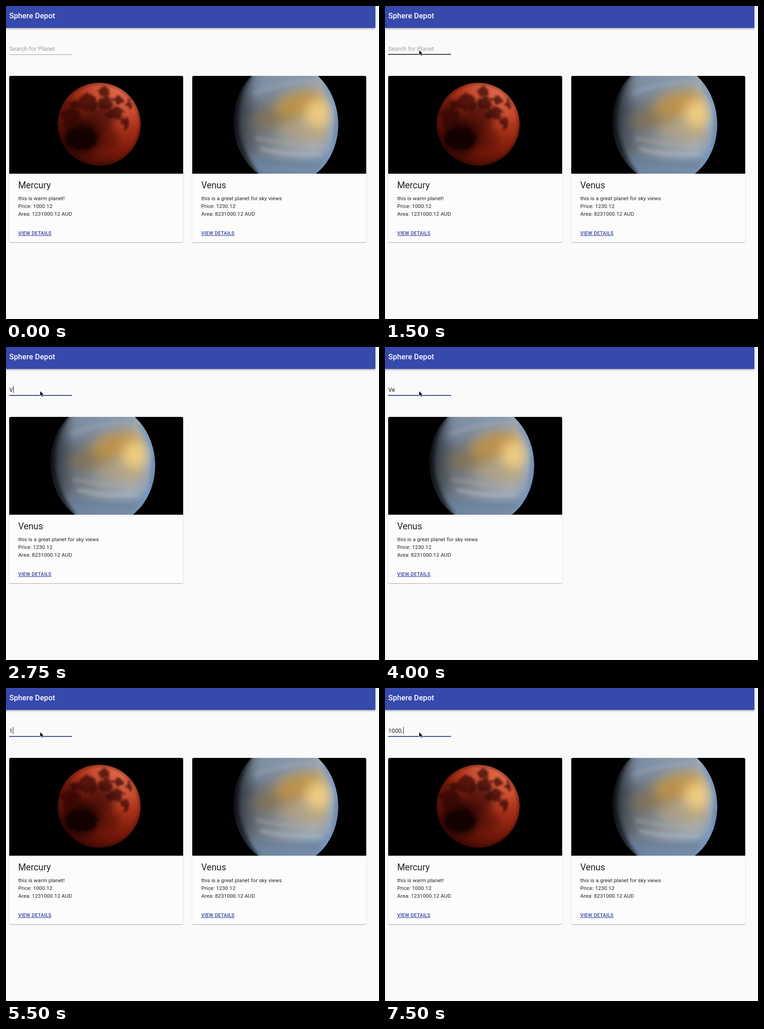
An HTML page that plays this animation: 817 by 685 pixels, repeating every 8 s.

```html
<!DOCTYPE html>
<html lang="en">
<head>
<meta charset="utf-8">
<title>Sphere Depot</title>
<style>
  html, body { margin: 0; width: 100%; height: 100%; overflow: hidden; background: #fafafa; }
  body { position: relative; font-family: Roboto, sans-serif; }
  .bar {
    position: absolute; left: -20px; top: -10px; width: 829px; height: 57.5px; background: #3649ac;
    box-shadow: 0 1.6px 3.3px -.8px rgba(0,0,0,.2), 0 3.3px 4.1px rgba(0,0,0,.14), 0 .8px 8.2px rgba(0,0,0,.12);
  }
  .card {
    position: absolute; left: 7px; top: 153px; width: 381px; height: 364px;
    border-radius: 3.3px; background: #fcfcfc;
    box-shadow: 0 .8px 2.5px rgba(0,0,0,.2), 0 .8px .8px rgba(0,0,0,.14), 0 1.6px .8px -.8px rgba(0,0,0,.12);
  }
  .card svg { display: block; width: 100%; height: 100%; border-radius: 3.3px; }
  .card filter { color-interpolation-filters: sRGB; }
  #venus { left: 408px; }
  #top { position: absolute; left: 0; top: 0; width: 817px; height: 685px; }
  .title { font-size: 16.4px; font-weight: 500; letter-spacing: .123px; fill: #fff; }
  .field { font-size: 13.12px; fill: #212121; }
  .field.hint { fill: #9e9e9e; }
  .name { font-size: 19.68px; fill: #212121; }
  .info { font-size: 11.48px; letter-spacing: .123px; fill: #212121; }
  .link { font-size: 10.66px; font-weight: 500; letter-spacing: .305px; fill: #303f9f; text-decoration: underline; }
</style>
</head>
<body>
<div class="bar"></div>

<div class="card" id="mercury">
  <svg>
    <defs>
      <radialGradient id="moonBase" gradientUnits="userSpaceOnUse" cx="250" cy="182" r="180">
        <stop offset="0" stop-color="#e0694a"/>
        <stop offset=".3" stop-color="#cb5033"/>
        <stop offset=".5" stop-color="#a83119"/>
        <stop offset=".75" stop-color="#7c1b0b"/>
        <stop offset="1" stop-color="#420a05"/>
      </radialGradient>
      <radialGradient id="moonRim">
        <stop offset=".9" stop-color="#200" stop-opacity="0"/>
        <stop offset="1" stop-color="#200" stop-opacity=".35"/>
      </radialGradient>
      <clipPath id="moonClip"><circle cx="204" cy="258.7" r="91"/></clipPath>
      <filter id="rough" x="-20%" y="-20%" width="140%" height="140%">
        <feTurbulence type="fractalNoise" baseFrequency=".07" numOctaves="3" seed="4"/>
        <feDisplacementMap in="SourceGraphic" scale="20" xChannelSelector="R" yChannelSelector="G"/>
        <feGaussianBlur stdDeviation="2"/>
      </filter>
      <filter id="soft" x="-60%" y="-60%" width="220%" height="220%"><feGaussianBlur stdDeviation="10"/></filter>
    </defs>
    <rect width="381" height="214"/>
    <g transform="translate(-7 -153)">
      <g fill="#4a2420">
        <circle cx="31" cy="247" r=".8"/><circle cx="34" cy="330" r=".8"/>
        <circle cx="18" cy="180" r=".6"/><circle cx="90" cy="174" r=".6"/>
      </g>
      <g clip-path="url(#moonClip)">
        <circle cx="204" cy="258.7" r="91" fill="url(#moonBase)"/>
        <g filter="url(#soft)">
          <ellipse cx="166" cy="286" rx="42" ry="36" fill="#120201" opacity=".9"/>
          <ellipse cx="145" cy="238" rx="24" ry="30" fill="#330703" opacity=".7"/>
          <ellipse cx="205" cy="243" rx="34" ry="32" fill="#3c0804" opacity=".75"/>
          <ellipse cx="220" cy="290" rx="28" ry="24" fill="#4a0c05" opacity=".6"/>
        </g>
        <g filter="url(#rough)" fill="#360805" opacity=".72">
          <ellipse cx="180" cy="211" rx="21" ry="18"/>
          <ellipse cx="213" cy="189" rx="13" ry="10"/>
          <ellipse cx="152" cy="214" rx="10" ry="12"/>
          <ellipse cx="217" cy="213" rx="13" ry="13"/>
          <ellipse cx="243" cy="205" rx="12" ry="9"/>
          <ellipse cx="240" cy="236" rx="18" ry="15"/>
          <ellipse cx="270" cy="215" rx="7" ry="9"/>
          <ellipse cx="262" cy="258" rx="8" ry="16"/>
          <ellipse cx="142" cy="245" rx="20" ry="20"/>
          <ellipse cx="165" cy="290" rx="35" ry="23" fill="#100201"/>
        </g>
        <circle cx="204" cy="258.7" r="91.5" fill="url(#moonRim)"/>
      </g>
    </g>
    <g class="text"></g>
  </svg>
</div>

<div class="card" id="venus">
  <svg>
    <defs>
      <linearGradient id="venusBase" gradientUnits="userSpaceOnUse" x1="498" y1="240" x2="728" y2="262">
        <stop offset="0" stop-color="#15181d"/>
        <stop offset=".08" stop-color="#3c434c"/>
        <stop offset=".25" stop-color="#69717b"/>
        <stop offset=".5" stop-color="#8f959b"/>
        <stop offset=".8" stop-color="#aab0b6"/>
        <stop offset=".94" stop-color="#8ba3c2"/>
        <stop offset="1" stop-color="#627d9f"/>
      </linearGradient>
      <clipPath id="frame"><rect width="381" height="214"/></clipPath>
      <clipPath id="venusClip"><ellipse cx="613" cy="256" rx="114.5" ry="133" transform="rotate(-5 613 256)"/></clipPath>
      <filter id="haze" x="-50%" y="-50%" width="200%" height="200%"><feGaussianBlur stdDeviation="13"/></filter>
      <filter id="streak" x="-20%" y="-40%" width="140%" height="180%"><feGaussianBlur stdDeviation="4"/></filter>
    </defs>
    <rect width="381" height="214"/>
    <g clip-path="url(#frame)">
      <g clip-path="url(#venusClip)" transform="translate(-408 -153)">
        <rect x="490" y="110" width="250" height="290" fill="url(#venusBase)"/>
        <g filter="url(#haze)">
          <path d="M540 130 L680 130 L690 170 Q620 170 535 215Z" fill="#8598ae" opacity=".8"/>
          <ellipse cx="585" cy="245" rx="48" ry="22" fill="#86714c" opacity=".75" transform="rotate(-12 585 245)"/>
          <ellipse cx="645" cy="215" rx="58" ry="28" fill="#bd9148" opacity=".95" transform="rotate(-14 645 215)"/>
          <ellipse cx="683" cy="237" rx="28" ry="34" fill="#efcb7e"/>
          <ellipse cx="655" cy="275" rx="60" ry="18" fill="#b7a279" opacity=".8" transform="rotate(10 655 275)"/>
          <path d="M520 325 Q610 345 715 318 L690 400 L540 400Z" fill="#6d86a5" opacity=".85"/>
        </g>
        <g filter="url(#streak)" fill="none" stroke-linecap="round">
          <path d="M560 313 Q620 328 690 324" stroke="#b9c4cf" stroke-width="8" opacity=".5"/>
          <path d="M550 290 Q610 302 700 308" stroke="#adaba4" stroke-width="8" opacity=".45"/>
          <path d="M550 338 Q610 346 685 348" stroke="#5c728d" stroke-width="7" opacity=".4"/>
          <path d="M545 190 Q600 168 670 165" stroke="#a3b2c3" stroke-width="7" opacity=".4"/>
          <path d="M696 172 Q730 215 727 270 Q720 320 685 365" stroke="#7694bb" stroke-width="9" opacity=".85"/>
          <path d="M530 153 Q497 200 499 250 Q505 315 545 368" stroke="#090b0f" stroke-width="15" opacity=".7"/>
        </g>
      </g>
    </g>
    <g class="text"></g>
  </svg>
</div>

<svg id="top">
  <text class="title" x="7.2" y="27">Sphere Depot</text>
  <text id="field" class="field" x="7" y="98"></text>
  <rect id="caret" y="85" width="1" height="16" fill="#222"/>
  <rect id="line" x="7" width="137.5"/>
  <rect id="focus" x="7" y="105" width="137.5" height="1.7" fill="#3344a6"/>
  <path id="arrow" d="M.6 .6V12.4L3.3 9.9L5.2 14.2L7.3 13.3L5.4 9.1H9.1Z" fill="#000" stroke="#fff" stroke-width=".9" stroke-linejoin="round"/>
</svg>

<script>
  const LOOP = 8000;
  const $ = id => document.getElementById(id);

  function fillCard(id, name, ...info) {
    const text = (cls, y, s) => `<text class="${cls}" x="19.7" y="${y}">${s}</text>`;
    $(id).querySelector('.text').innerHTML = text('name', 246, name) +
      info.map((s, i) => text('info', 272 + i * 17.2, s)).join('') +
      text('link', 348, 'VIEW DETAILS');
  }
  fillCard('mercury', 'Mercury', 'this is warm planet!', 'Price: 1000.12', 'Area: 1231000.12 AUD');
  fillCard('venus', 'Venus', 'this is a great planet for sky views', 'Price: 1230.12', 'Area: 8231000.12 AUD');

  // time, then value(s) held until the next step
  const pointer = [[0, -50, -50], [250, 455, 41], [500, 206, 82], [750, 108, 103], [1000, 81, 91], [1500, 74, 95.5]];
  const focus = [[0, 0], [1750, .7], [2000, 1]];
  // time, typed text, caret x (0 = hidden)
  const typing = [
    [0, '', 0], [1750, '', 7], [2250, '', 0],
    [2750, 'V', 16], [3000, 'Ve', 22], [3250, 'Ven', 29], [3750, 'Ven', 0], [4000, 'Ve', 0],
    [4250, '', 7], [4750, '', 0], [5250, '', 7],
    [5500, '1', 15], [5750, '10', 22], [6000, '1000', 37], [6500, '1000', 0], [7000, '1000', 37], [7500, '1000.', 40]
  ];
  const at = (steps, t) => steps.findLast(s => s[0] <= t);

  function draw(t) {
    const [, px, py] = at(pointer, t);
    $('arrow').setAttribute('transform', `translate(${px} ${py})`);

    const [, typed, caret] = at(typing, t);
    $('field').textContent = typed || 'Search for Planet';
    $('field').setAttribute('class', typed ? 'field' : 'field hint');
    $('caret').setAttribute('x', caret);
    $('caret').style.display = caret ? '' : 'none';

    const hover = t >= 1500;
    $('line').setAttribute('y', hover ? 105 : 106);
    $('line').setAttribute('height', hover ? 1.7 : .8);
    $('line').setAttribute('fill', hover ? '#1c1c1c' : '#858585');
    const grow = at(focus, t)[1];
    $('focus').setAttribute('transform', `translate(${75.75 * (1 - grow)} 0) scale(${grow} 1)`);

    const filtered = typed.startsWith('V');
    $('mercury').style.display = filtered ? 'none' : '';
    $('venus').style.left = filtered ? '7px' : '408px';
  }

  const start = performance.now();
  function tick() {
    draw((performance.now() - start) % LOOP);
    requestAnimationFrame(tick);
  }
  tick();
</script>
</body>
</html>
```
